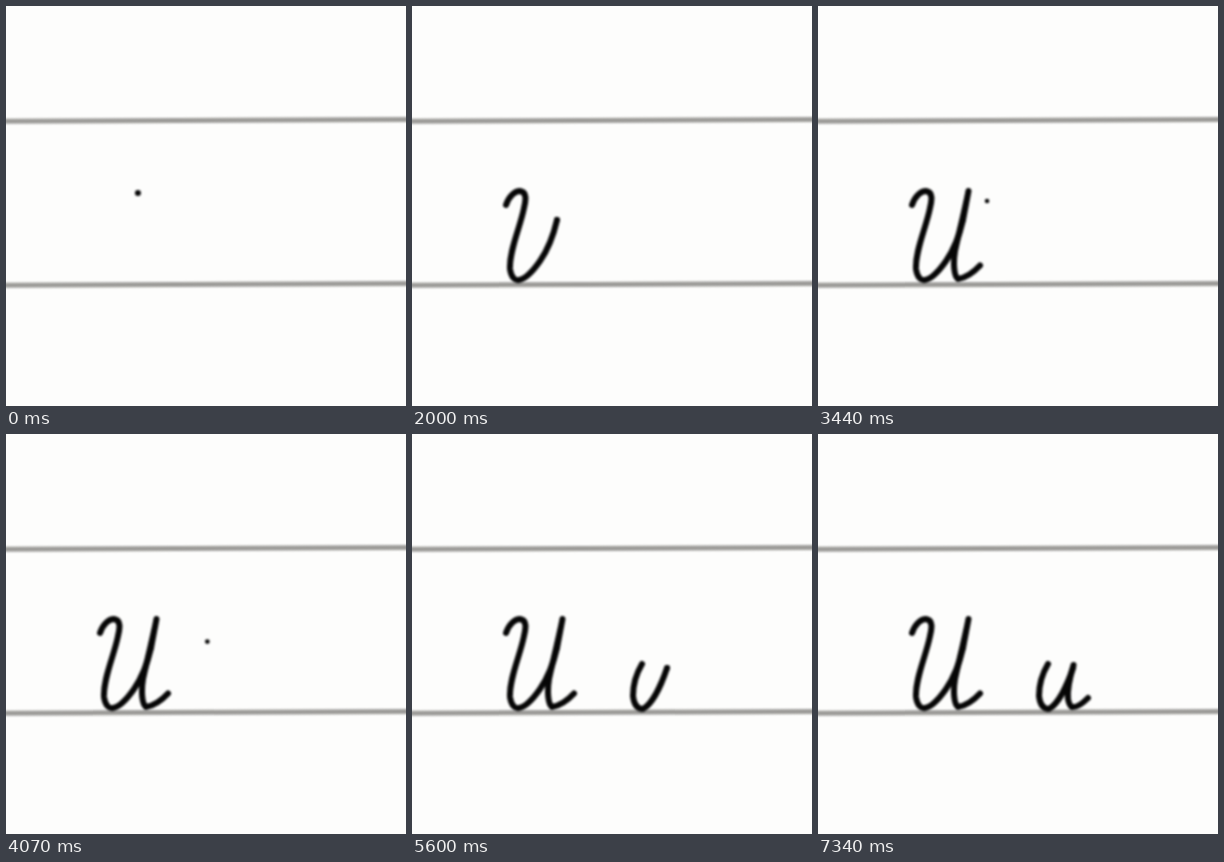
An HTML page that plays this animation: 400 px wide and 400 px high, repeating every 7380 ms.

```html
<!DOCTYPE html>
<html lang="en">
<head>
<meta charset="utf-8">
<title>Handwriting U u</title>
<style>
  html, body { margin: 0; width: 100%; height: 100%; overflow: hidden; background: #fdfdfc; }
  svg { display: block; width: 100%; height: 100%; }
  path { fill: none; stroke-linecap: round; stroke-linejoin: round; }
</style>
</head>
<body>
<svg viewBox="0 0 400 400">
  <defs>
    <filter id="soft" filterUnits="userSpaceOnUse" x="-10" y="0" width="420" height="400" color-interpolation-filters="sRGB">
      <feGaussianBlur stdDeviation="0.9"/>
    </filter>
  </defs>
  <g filter="url(#soft)">
    <path d="M-9 115.2L409 113.4M-9 279.2L409 277.4" stroke="#9c9b98" stroke-width="5"/>
  </g>
  <g filter="url(#soft)">
    <g id="ink" stroke="#060606" stroke-width="6"></g>
    <circle id="pen" fill="#060606"/>
  </g>
</svg>
<script>
const LOOP = 7380;

const strokes = [
  { from: 600, to: 2000, d: 'M94 199C97 190 103 185 108 185C115 186 114 194 112 202C108 222 97 245 98 263C99 271 103 275 107 274C113 273 121 265 128 255C137 242 142 227 145 214' },
  { from: 2000, to: 3150, d: 'M145 214L150.5 185C147 203 140 231 137 245C135 258 136 270 140 273C146 272 155 267 162 259.5' },
  { from: 4680, to: 5600, d: 'M230 230C224 240 221 250 221 262C222 271 226 275 231 275C240 270 249 252 255 234' },
  { from: 5600, to: 6400, d: 'M255 234L255.5 231C252 243 249 255 250 265C251 270 252 272 254 273' },
  { from: 6400, to: 6900, d: 'M254 273C259 274 264 270 270 264' }
];

// Pen tip hovering between strokes: time, x, y, radius
const hovers = [
  [[0, 132, 187, 3], [600, 94, 199, 3]],
  [[3150, 162, 260, 3], [3440, 169, 195, 2.3], [4000, 198, 205, 2.3], [4680, 230, 230, 3]]
];

const ink = document.getElementById('ink');
const pen = document.getElementById('pen');

for (const s of strokes) {
  s.path = document.createElementNS('http://www.w3.org/2000/svg', 'path');
  s.path.setAttribute('d', s.d);
  s.path.setAttribute('pathLength', 1);
  ink.append(s.path);
}

function hoverAt(t) {
  for (const keys of hovers) {
    for (let i = 1; i < keys.length; i++) {
      const a = keys[i - 1], b = keys[i];
      if (t >= a[0] && t < b[0]) {
        const k = (t - a[0]) / (b[0] - a[0]);
        return a.map((v, j) => v + (b[j] - v) * k);
      }
    }
  }
  return null;
}

function render(t) {
  for (const { from, to, path } of strokes) {
    const p = Math.min(1, Math.max(0.001, (t - from) / (to - from)));
    path.style.display = t < from ? 'none' : '';
    path.setAttribute('stroke-dasharray', p < 1 ? `${p} 2` : 'none');
  }
  const spot = hoverAt(t);
  pen.style.display = spot ? '' : 'none';
  if (spot) {
    pen.setAttribute('cx', spot[1]);
    pen.setAttribute('cy', spot[2]);
    pen.setAttribute('r', spot[3]);
  }
}

const start = performance.now();
function frame() {
  render((performance.now() - start) % LOOP);
  requestAnimationFrame(frame);
}
frame();
</script>
</body>
</html>
```
